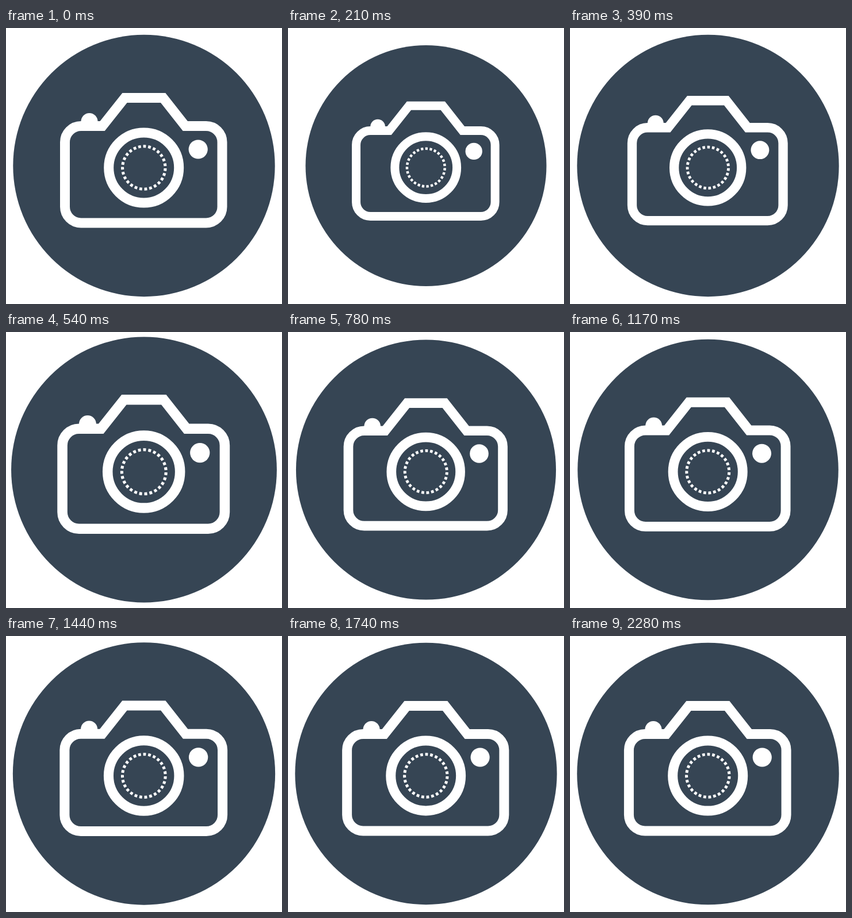
Recreate the animation shown at these times as an HTML page. Size 480x480 px, loop 2310 ms.

```html
<!DOCTYPE html>
<html lang="en">
<head>
<meta charset="utf-8">
<title>Camera pulse</title>
<style>
  html, body { margin: 0; width: 100%; height: 100%; overflow: hidden; background: #fff; }
  svg { display: block; width: 100%; height: 100%; }
</style>
</head>
<body>
<svg viewBox="0 0 480 480">
  <circle id="disc" cx="240" cy="239.5" r="227.7" fill="#364554"/>
  <g id="camera" fill="none" stroke="#fff" stroke-width="17">
    <path d="M167.6 170.5H130.5a28 28 0 0 0-28 28V311a28 28 0 0 0 28 28H348a28 28 0 0 0 28-28V198.500a28 28 0 0 0-28-28H311.800L273.200 121.500H206.500Z"/>
    <circle cx="239.700" cy="243" r="61"/>
    <circle id="dots" cx="239.800" cy="243" r="37.200" stroke-width="5" pathLength="54"
      stroke-dasharray="1.100 .900" stroke-dashoffset=".550" transform="rotate(-88.200 239.800 243)"/>
    <g fill="#fff" stroke="none">
      <circle cx="145" cy="162.500" r="14.500"/>
      <circle cx="334.200" cy="211" r="16.600"/>
    </g>
  </g>
</svg>
<script>
const LOOP = 2310, STEP = 30, DIP = 0.1, HALF = 150;
const BOUNCE = 0.023, PERIOD = 450, DECAY = 0.00222;
const disc = document.getElementById('disc');
const camera = document.getElementById('camera');

// Linear dip and return, then a decaying bounce around 1.
function pulse(t) {
  if (t <= 0) return 1;
  const s = t - 2 * HALF;
  if (s < 0) return 1 - DIP * (1 - Math.abs(t - HALF) / HALF);
  return 1 + BOUNCE * Math.exp(-DECAY * s) * Math.sin(2 * Math.PI * s / PERIOD);
}

function scale(el, k) {
  el.setAttribute('transform', `translate(240 240) scale(${k}) translate(-240 -240)`);
}

function draw(now) {
  const t = Math.floor(now % LOOP / STEP) * STEP;
  const outer = pulse(t - 90);
  scale(disc, outer);
  scale(camera, outer * pulse(t - 150));
}

const start = performance.now();
function tick() {
  draw(performance.now() - start);
  requestAnimationFrame(tick);
}
tick();
</script>
</body>
</html>
```
